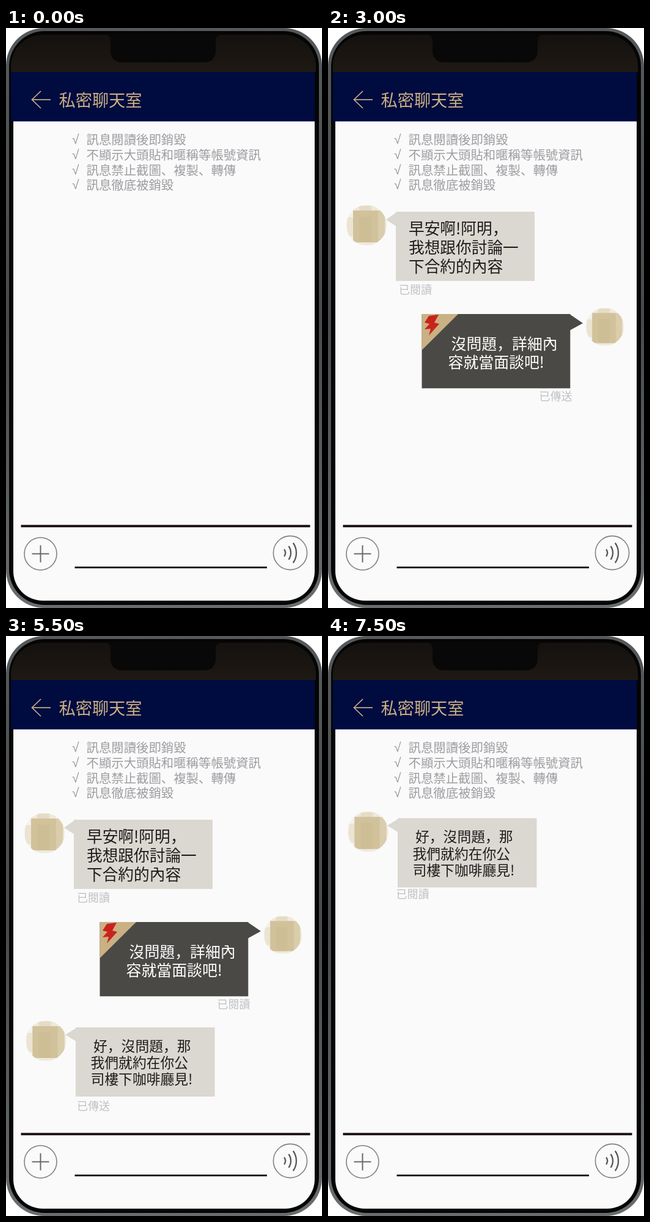
Recreate the animation shown at these times as an HTML page with a canvas. Size 517 by 947 pixels, loop 8000 ms.

```html
<!DOCTYPE html>
<html lang="ja">
<head>
<meta charset="utf-8">
<title>私密聊天室</title>
<style>
html, body { margin: 0; width: 100%; height: 100%; overflow: hidden; background: #fff; }
canvas { display: block; width: 517px; height: 947px; }
</style>
</head>
<body>
<canvas id="stage" width="517" height="947" lang="ja"></canvas>
<script>
const ctx = document.getElementById('stage').getContext('2d');
const LOOP = 8000, STEP = 1500;
const CJK = '"Noto Sans CJK JP", "Noto Sans CJK TC", "Noto Sans CJK", sans-serif';
const BEIGE = '#dbd7d1', DARK = '#4a4946', GOLD = '#c9b184';

function rect(x, y, w, h, color) {
  ctx.fillStyle = color;
  ctx.fillRect(x, y, w, h);
}

function round(x, y, w, h, r, color) {
  ctx.fillStyle = color;
  ctx.beginPath();
  ctx.roundRect(x, y, w, h, r);
  ctx.fill();
}

function poly(points, color) {
  ctx.fillStyle = color;
  ctx.beginPath();
  for (const [x, y] of points) ctx.lineTo(x, y);
  ctx.fill();
}

function stroke(points, color, width) {
  ctx.strokeStyle = color;
  ctx.lineWidth = width;
  ctx.beginPath();
  for (const [x, y] of points) ctx.lineTo(x, y);
  ctx.stroke();
}

function arc(x, y, r, from, to, color, width) {
  ctx.strokeStyle = color;
  ctx.lineWidth = width;
  ctx.beginPath();
  ctx.arc(x, y, r, from, to);
  ctx.stroke();
}

function text(str, x, y, size, color, family = CJK) {
  ctx.font = `${size}px ${family}`;
  ctx.fillStyle = color;
  ctx.fillText(str, x, y);
}

function at(x, y, draw) {
  ctx.save();
  ctx.translate(x, y);
  draw();
  ctx.restore();
}

function phone() {
  rect(0, 0, 517, 947, '#fff');
  const metal = ctx.createLinearGradient(0, 0, 0, 947);
  metal.addColorStop(0, '#56595b');
  metal.addColorStop(0.5, '#484b4d');
  metal.addColorStop(1, '#6a6d6f');
  round(0, 0, 517, 947, 62, metal);
  round(5, 5, 507, 937, 58, '#050505');
  const bezel = ctx.createLinearGradient(0, 10, 0, 72);
  bezel.addColorStop(0, '#14110e');
  bezel.addColorStop(1, '#1e1914');
  round(8, 11, 499, 61, [52, 52, 0, 0], bezel);

  ctx.fillStyle = '#080808';
  ctx.beginPath();
  ctx.moveTo(160, 10);
  ctx.quadraticCurveTo(171, 11, 171, 22);
  ctx.lineTo(171, 36);
  ctx.quadraticCurveTo(171, 56, 191, 56);
  ctx.lineTo(323, 56);
  ctx.quadraticCurveTo(343, 56, 343, 36);
  ctx.lineTo(343, 22);
  ctx.quadraticCurveTo(343, 11, 354, 10);
  ctx.fill();

  round(12, 140, 493, 795, [0, 0, 48, 48], '#fafafa');
  rect(8, 72, 497, 80.5, '#000b40');
}

function header() {
  stroke([[43, 117], [73, 117]], GOLD, 1.7);
  stroke([[57, 103], [42.5, 117], [57, 131]], GOLD, 1.7);
  text('私密聊天室', 86.5, 128, 27.2, GOLD);
  const rules = ['訊息閱讀後即銷毀', '不顯示大頭貼和暱稱等帳號資訊',
    '訊息禁止截圖、複製、轉傳', '訊息徹底被銷毀'];
  rules.forEach((rule, i) => {
    const y = 190.3 + i * 24.6;
    text('√', 108, y - 1, 21, '#98999c', '"Liberation Sans", sans-serif');
    text(rule, 131.5, y, 20.4, '#9c9da1');
  });
}

function footer() {
  rect(24.5, 811.3, 473, 3.9, '#1a1114');
  rect(112.5, 879.4, 314.5, 2.8, '#161214');
  arc(56.5, 858.5, 26.5, 0, 7, '#808080', 1.6);
  stroke([[42.5, 858.5], [70.5, 858.5]], '#686868', 2);
  stroke([[56.5, 844.5], [56.5, 872.5]], '#686868', 2);
  arc(465, 857, 27.6, 0, 7, '#808080', 1.6);
  for (const r of [10, 19, 28]) arc(447, 857, r, -0.62, 0.62, '#585858', 2.3);
}

// Mosaic portrait, centred on the given point.
function avatar(x, y, scale = 1) {
  at(x, y, () => {
    ctx.scale(scale, scale);
    ctx.beginPath();
    ctx.arc(0, 0, 33, 0, 7);
    ctx.fillStyle = '#f4f1ea';
    ctx.fill();
    ctx.clip();
    rect(-22, -32, 41, 64, '#efe9db');
    rect(-32, -13, 64, 31, '#ebe4d2');
    rect(-12, -32, 20, 9, '#e5dcc5');
    rect(-22, -24, 52, 52, '#dacdac');
    rect(-22, -24, 41, 52, '#d1c29b');
    rect(-12, -14, 20, 42, '#cebe95');
  });
}

function status(str, x, y) {
  text(str, x, y + 7, 18, '#bfc0c4');
}

function greeting() {
  avatar(63, 322);
  poly([[95, 313], [112, 301], [112, 324]], BEIGE);
  rect(111, 300, 227, 113, BEIGE);
  ['早安啊!阿明，', '我想跟你討論一', '下合約的內容'].forEach((line, i) =>
    text(line, 132, 336.8 + i * 31, 25.7, '#1e1c1b'));
}

function reply() {
  avatar(453, 488, 0.94);
  rect(153.5, 467, 242.8, 121.3, DARK);
  poly([[395, 467], [417, 482], [395, 494]], DARK);
  poly([[153.5, 467], [213, 467], [153.5, 526]], GOLD);
  poly([[165, 470], [181, 468], [174, 481], [182, 483], [165, 502],
    [168, 491], [158, 492], [166, 483], [158, 481]], '#c9231d');
  text('沒問題，詳細內', 201.5, 525.3, 24.9, '#fff');
  text('容就當面談吧!', 196.5, 555.3, 24.9, '#fff');
}

function meeting() {
  avatar(65.5, 661);
  poly([[97, 651], [115, 640], [115, 662]], BEIGE);
  rect(114, 639, 227.5, 113, BEIGE);
  text('好，沒問題，那', 143, 677.6, 22.8, '#1e1c1b');
  text('我們就約在你公', 138.5, 705, 22.8, '#1e1c1b');
  text('司樓下咖啡廳見!', 138.5, 732.2, 22.8, '#1e1c1b');
}

function chat(step) {
  if (step >= 1 && step <= 3) {
    greeting();
    status('已閱讀', 116, 427);
  }
  if (step === 2 || step === 3) {
    reply();
    status(step === 2 ? '已傳送' : '已閱讀', 345.5, 601);
  }
  if (step === 3) {
    meeting();
    status('已傳送', 116, 767);
  }
  if (step === 4) {
    at(2, -167, reply);
    status('已閱讀', 335, 432);
    at(-4.5, -175.5, meeting);
    status('已閱讀', 107, 587);
  }
  if (step === 5) {
    at(0, -341.5, meeting);
    status('已閱讀', 111.5, 421);
  }
}

function frame(now) {
  phone();
  header();
  footer();
  chat(Math.floor((now % LOOP) / STEP));
}

const start = performance.now();
function tick() {
  frame(performance.now() - start);
  requestAnimationFrame(tick);
}
tick();
</script>
</body>
</html>
```
